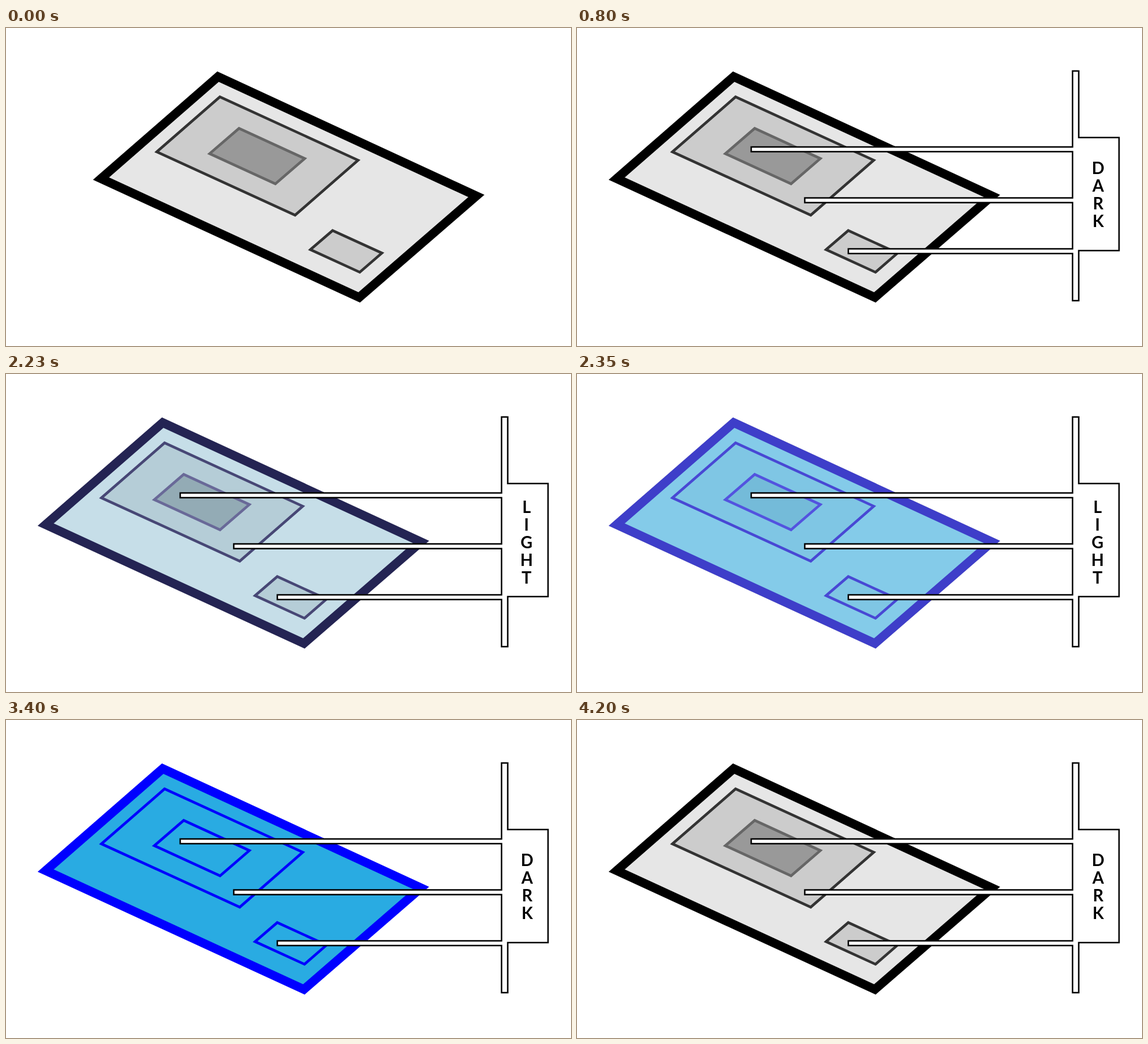
An HTML page for the animation above (4700 ms loop, 960 by 540 pixels).

```html
<!DOCTYPE html>
<html lang="en">
<head>
<meta charset="utf-8">
<title>Light and dark switch</title>
<style>
  html, body { margin: 0; width: 100%; height: 100%; overflow: hidden; background: #fff; }
  svg { display: block; width: 960px; height: 540px; }
  polygon { stroke-width: 4.5; stroke-miterlimit: 10; }
  .frame { stroke-width: 15; }
  .grey .frame { fill: #e6e6e6; stroke: #000; }
  .grey .panel { fill: #ccc; stroke: #333; }
  .grey .button { fill: #999; stroke: #666; }
  .blue polygon { fill: #29abe2; stroke: #00f; }
  #wires path { fill: #fff; stroke: #000; stroke-width: 2.5; }
  text { font: 700 28px Lato, sans-serif; text-anchor: middle; }
</style>
</head>
<body>
<svg viewBox="0 0 960 540">
  <g id="board">
    <g id="grey" class="grey"></g>
    <g id="blue" class="blue"></g>
  </g>
  <g id="wires">
    <path d="M842 73H852.5V186H921V378H852.5V463H842V383H461V375H842V296.5H387V288.5H842V210H296V202H842Z"/>
    <g id="label"></g>
  </g>
</svg>
<script>
const LOOP = 4700, STEPS = 11, STEP_MS = 30;
const byId = id => document.getElementById(id);
const board = byId('board'), grey = byId('grey'), blue = byId('blue');
const wires = byId('wires'), label = byId('label');

grey.innerHTML = blue.innerHTML = `
  <polygon class="frame" points="67.5,255.7 266.3,82.6 705.2,285.2 506.2,457.5"/>
  <polygon class="panel" points="162.2,210.3 269.4,117 504.2,224.5 397.2,317.8"/>
  <polygon class="button" points="252,213.4 301.9,170.5 413.5,221.6 363.7,264.6"/>
  <polygon class="panel" points="423.3,376.3 460.9,344 544.7,382.2 507.1,414.7"/>`;
const buttons = document.querySelectorAll('.button');

// Letters stacked every 30 px, centred on the box.
const stack = (word, x, top) => [...word].map((letter, i) =>
  `<text x="${x}" y="${top + 30 * i}">${letter}</text>`).join('');
const words = { DARK: stack('DARK', 885.5, 248), LIGHT: stack('LIGHT', 884.5, 236) };

// Stepped progress 0..1, already one step in at the start time.
const progress = (t, start) =>
  Math.max(0, Math.min(STEPS, Math.floor((t - start) / STEP_MS) + 1)) / STEPS;
const within = (t, from, to) => t >= from && t < to;

let shownWord;
function draw() {
  const t = performance.now() % LOOP;
  const away = 1 - progress(t, 500);
  board.setAttribute('transform', `translate(${94 * away} 0)`);
  wires.setAttribute('transform', `translate(${692 * away} ${1.8 * away})`);

  const blueness = progress(t, 2200) - progress(t, 3900);
  grey.setAttribute('opacity', 1 - blueness);
  blue.setAttribute('opacity', blueness);

  const pressed = within(t, 1300, 1500) || within(t, 3000, 3200);
  buttons.forEach(b => b.setAttribute('visibility', pressed ? 'hidden' : 'visible'));

  const word = within(t, 1700, 3400) ? 'LIGHT' : 'DARK';
  if (word !== shownWord) label.innerHTML = words[shownWord = word];
  requestAnimationFrame(draw);
}
draw();
</script>
</body>
</html>
```
